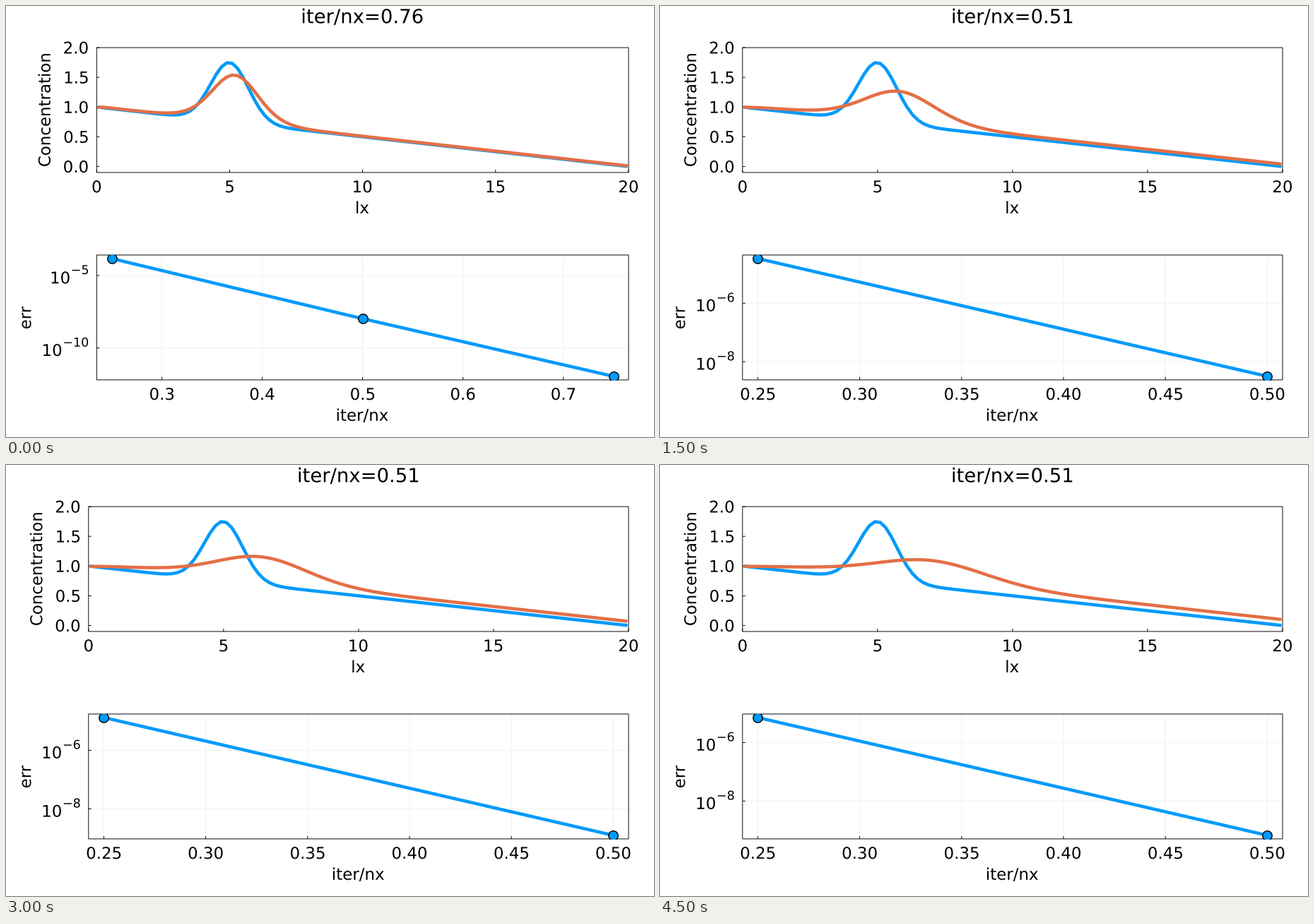
These frames come from a looping animation (917x611 px, 5 s). A matplotlib script:

```python
import numpy as np
import matplotlib.pyplot as plt
from matplotlib.animation import FuncAnimation
from matplotlib.patches import PathPatch, Rectangle
from matplotlib.textpath import TextPath
from matplotlib.transforms import Affine2D

plt.rcParams["font.family"] = "DejaVu Sans"

W, H, DPI = 917, 611, 64
PT = 72 / DPI                      # points per pixel
BLUE, ORANGE = "#009AFA", "#E36F47"
RIGHT = 881
TOP_BOX, ERR_BOX = (59, 236), (353, 530)
LABEL, TITLE, POWER = 22.93, 27.5, 17.5

# Advection-diffusion model
LX, NX, DC, VX, STEPS = 20.0, 100, 1.0, 1.0, 10
DX = LX / NX
DT = DX / VX
X = (np.arange(NX) + 0.5) * DX
C0 = 1 + np.exp(-(X - LX / 4) ** 2) - X / LX

# log10 of the first residual in each time step, and its drop per check
FIRST_ERR = [-3.83, -4.043, -4.277, -4.475, -4.634,
             -4.771, -4.88, -4.986, -5.067, -5.145]
DROP = 4.025


def simulate():
    """Implicit diffusion with fixed ends, then upwind advection."""
    k = DC * DT / DX ** 2
    a = np.eye(NX)
    for i in range(1, NX - 1):
        a[i, i - 1:i + 2] = -k, 1 + 2 * k, -k
    c, states = C0.copy(), []
    for _ in range(STEPS):
        c = np.linalg.solve(a, c)
        c[1:] -= DT * VX * np.diff(c) / DX
        states.append(c.copy())
    return states


STATES = simulate()

fig = plt.figure(figsize=(W / DPI, H / DPI), dpi=DPI, facecolor="white")
ax = fig.add_axes([0, 0, 1, 1])


def scale(lo, hi, a, b):
    return lambda v: a + (np.asarray(v) - lo) / (hi - lo) * (b - a)


def write(x, y, s, size=LABEL, align=0.5, rot=0):
    """Outline text on a baseline; align 0.5 centres it, 1 ends it at x.

    Returns the width of the inked part.
    """
    path = TextPath((0, 0), s, size=size)
    box = path.get_extents()
    place = (Affine2D().translate(-box.x0 - align * box.width, 0)
             .scale(1, -1).rotate_deg(-rot).translate(x, y))
    ax.add_patch(PathPatch(place.transform_path(path), fc="black", lw=0,
                           snap=False, zorder=6))
    return box.width


def line(x, y, color="black", width=0.95, **kw):
    ax.plot(x, y, color=color, lw=width * PT, snap=False,
            solid_capstyle=kw.pop("cap", "butt"), **kw)


def curve(x, y, color):
    line(x, y, color, 4.58, cap="projecting", solid_joinstyle="round",
         zorder=4)


def frame(left, box, xs, ys, grid=False):
    """Box with inward ticks at pixel positions xs and ys."""
    top, bottom = box
    if grid:
        for x in xs:
            line([x, x], [top, bottom], "#F0F0F0", zorder=1)
        for y in ys:
            line([left, RIGHT], [y, y], "#F0F0F0", zorder=1)
    for x in xs:
        line([x, x], [bottom, bottom - 4], zorder=2)
    for y in ys:
        line([left, left + 4], [y, y], zorder=2)
    rect = Rectangle((left, top), RIGHT - left, bottom - top, fill=False,
                     ec="black", lw=0.95 * PT, snap=False, zorder=3)
    ax.add_patch(rect)
    return rect


def write_power(x, y, exp):
    width = write(x, y - 1.9, f"\u2212{-exp}", POWER, align=1)
    write(x - width - 4, y + 11.3, "10", align=1)


def x_labels(xs, names, box):
    for x, name in zip(xs, names):
        write(x, box[1] + 28.2, name)


def draw_profile(left, c):
    mx = scale(0, LX, left, RIGHT)
    my = scale(2.0, -0.1, *TOP_BOX)
    xt, yt = np.arange(0, 21, 5), np.arange(0, 2.1, 0.5)
    frame(left, TOP_BOX, mx(xt), my(yt))
    x_labels(mx(xt), map(str, xt), TOP_BOX)
    for y in yt:
        write(left - 12.7, my(y) + 8.4, f"{y:.1f}", align=1)
    curve(mx(X), my(C0), BLUE)
    curve(mx(X), my(c), ORANGE)
    write((left + RIGHT) / 2, TOP_BOX[1] + 58, "lx")
    write(left - 65.6, sum(TOP_BOX) / 2, "Concentration", rot=90)


def draw_error(left, n):
    first = FIRST_ERR[n]
    if n == 0:
        it, err = [0.25, 0.5, 0.75], [first, -7.98, -11.96]
        xt, fmt, powers = np.arange(3, 8) / 10, "{:.1f}", (-5, -10)
    else:
        it, err = [0.25, 0.5], [first, first - DROP]
        xt, fmt = np.arange(5, 11) / 20, "{:.2f}"
        powers = range(-4, -9, -1) if n == 1 else (-6, -8)
    x_pad = 0.03 * (it[-1] - it[0])
    y_pad = 0.03 * (err[0] - err[-1])
    mx = scale(it[0] - x_pad, it[-1] + x_pad, left, RIGHT)
    my = scale(err[0] + y_pad, err[-1] - y_pad, *ERR_BOX)
    ys = [float(my(p)) for p in powers]
    rect = frame(left, ERR_BOX, mx(xt), ys, grid=True)
    x_labels(mx(xt), map(fmt.format, xt), ERR_BOX)
    for p, y in zip(powers, ys):
        write_power(left - 12.2, y, p)
    curve(mx(it), my(err), BLUE)
    dots = ax.plot(mx(it), my(err), "o", ms=13.4 * PT, mfc=BLUE,
                   mec="black", mew=1.4 * PT, snap=False, zorder=5)[0]
    dots.set_clip_path(rect)
    write((left + RIGHT) / 2, ERR_BOX[1] + 58, "iter/nx")
    write(35.3, sum(ERR_BOX) / 2, "err", rot=90)


def draw(n):
    ax.clear()
    ax.set_xlim(0, W)
    ax.set_ylim(H, 0)
    ax.axis("off")
    left = 128.3 if n == 0 else 116.8
    ratio = 0.76 if n == 0 else 0.51
    write((left + RIGHT) / 2, 24.3, f"iter/nx={ratio:.2f}", TITLE)
    draw_profile(left, STATES[n])
    draw_error(left, n)
    return []


anim = FuncAnimation(fig, draw, frames=STEPS, interval=500,
                     init_func=lambda: draw(0), repeat=True,
                     repeat_delay=0, blit=False)
plt.show()
```
